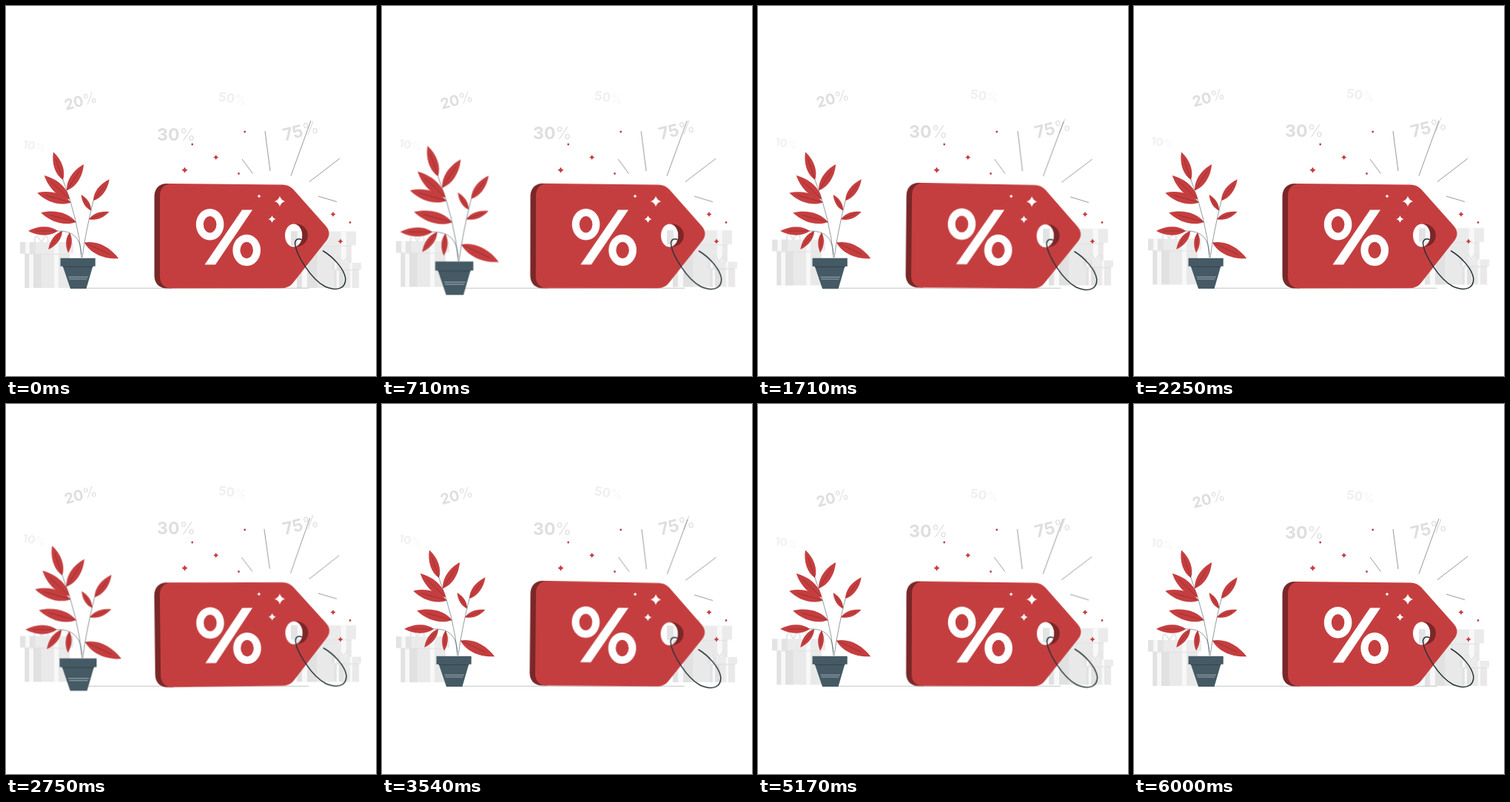
These frames come from a looping animation (500 px wide and 500 px high, 6.04 s). An HTML page:

```html
<!DOCTYPE html>
<html lang="en">
<head>
<meta charset="utf-8">
<title>Discount tag</title>
<style>
  html, body { margin: 0; width: 100%; height: 100%; overflow: hidden; background: #fff; }
  svg { display: block; width: 100%; height: 100%; }

  .float, .tag, .plant { animation: 6.04s linear infinite; }
  .float { animation-name: float; }
  .tag { animation-name: sway; transform-origin: 330px 268px; }
  .plant { animation-name: beat; transform-origin: 91.5px 289.5px; }

  @keyframes float {
    0%, 99.338%, 100% { transform: translateY(0); }
    49.669% { transform: translateY(-6px); }
  }
  /* four swings of 1.5 s */
  @keyframes sway {
    0%, 99.338%, 100% { transform: rotate(0deg); }
    6.209%, 31.043%, 55.877%, 80.712% { transform: rotate(1deg); }
    18.626%, 43.46%, 68.295%, 93.129% { transform: rotate(-1deg); }
  }
  @keyframes beat {
    0%, 28.5%, 39.5%, 58.5%, 100% { transform: scale(1); }
    10%, 49.5% { transform: scale(1.1); }
  }

  text { font-family: Inter, Roboto, sans-serif; font-weight: 700; text-anchor: middle; fill: #dedede; }
  text tspan { font-weight: 300; }
  .pale { fill: #efefef; }
  .pale tspan { fill: #f4f4f4; }
  .red { fill: #c53e3f; }
  .dark { fill: #7a2728; }
  .white { fill: #fff; }
  .dots { fill: none; stroke: #c53e3f; stroke-width: 2.8; stroke-linecap: round; }
  .bow { fill: none; stroke: #e6e6e6; stroke-width: 2; }
  .thin { fill: none; stroke: #37474f; stroke-width: .55; }
  .rib { stroke: #7a2728; stroke-width: .5; }
  .cord { fill: none; stroke: #263238; stroke-width: 1.5; stroke-linecap: round; }
</style>
</head>
<body>
<svg viewBox="0 0 500 500">
  <g class="float">
    <text transform="translate(230 173.2)" y="8.3" font-size="23">30<tspan>%</tspan></text>
    <text transform="translate(398 168.5) rotate(-14)" y="8.3" font-size="23">75<tspan>%</tspan></text>
    <text transform="translate(100.7 128.3) rotate(-15)" y="7.2" font-size="20">20<tspan>%</tspan></text>
    <text class="pale" transform="translate(306 125) rotate(9)" y="6" font-size="17">50<tspan>%</tspan></text>
    <text class="pale" transform="translate(38 189.5) rotate(10)" y="5.3" font-size="15">10<tspan>%</tspan></text>
  </g>

  <g class="float" id="gifts"></g>

  <path d="M95 381.3H409" stroke="#a8adb0" stroke-width=".7"/>

  <g class="tag">
    <path class="thin" d="M319 207L333.5 226.5M350 169L357 223M412 155L385 229.5M451 206L410 237.5M422 257L447 264.5"/>
    <path class="dark" d="M224 240H217C207 240 200.5 247 200.5 257V364C200.5 375 207 381.5 217 381.5H224Z"/>
    <path class="red" fill-rule="evenodd" d="M223 240L374 241.5Q382 241.5 388 247.5L432 297Q440.5 307 433 317L388 374Q383 381 373 381.3L223 381.5C214 381.5 208 375 208 366V256C208 247 214 240 223 240ZM377 310A11.7 15.5 0 1 0 400.4 310A11.7 15.5 0 1 0 377 310Z"/>
    <path class="dark" d="M390 294.3C414 294 414 326 390 325.7C404 323 404 297 390 294.3Z"/>
    <g fill="none" stroke="#fff" stroke-width="10">
      <ellipse cx="275.6" cy="295.2" rx="13.8" ry="16.2"/>
      <ellipse cx="325.2" cy="330" rx="13.8" ry="16.2"/>
    </g>
    <path class="white" d="M319 275.5H333L283 349.5H268.5Z"/>
    <g class="white" id="glints"></g>
    <path class="cord" d="M399 315.5C394 313.5 390.5 316 390.5 321C392 336 412 369 431 379C447 386 459.5 382 458.8 368C457 355 442 339 428.5 331"/>
  </g>

  <g class="red" id="sparks"></g>
  <path class="dots" d="M251.7 187h0M322.7 170h0M314.5 226.5h0M465 292.5h0"/>

  <g class="plant">
    <g id="branches"></g>
    <path fill="#455a64" d="M76.5 351H117.5L108.5 382H87Z"/>
    <path fill="#34474f" d="M76.5 351.5H117.5L117 353H77Z"/>
    <path fill="#455a64" d="M73.5 340.7H120.7V351.8H73.5Z"/>
    <path stroke="#a9b8bf" stroke-width=".9" d="M84.5 366.2H111M85.5 368.9H109.5"/>
  </g>
</svg>
<script>
  const add = (id, markup) => { document.getElementById(id).innerHTML += markup; };
  const rect = (x1, y1, x2, y2, fill) =>
    `<path fill="${fill}" d="M${x1} ${y1}H${x2}V${y2}H${x1}Z"/>`;

  // Box with lid, bow and two ribbons; all widths follow from w.
  function gift(x, top, w, lid, ribbon) {
    const at = f => x + w * f, y = top + lid, floor = 381;
    const strips = (shift, y1, y2) =>
      rect(at(0.1 + shift), y1, at(0.18 + shift), y2, '#f8f8f8') +
      rect(at(ribbon), y1, at(ribbon + 0.08), y2, '#f8f8f8');
    const c = at(0.4), r = 9;
    return `<path class="bow" d="M${c} ${top}q${-r} ${-r * 1.8} ${-r} 0M${c} ${top}q${r} ${-r * 1.8} ${r} 0"/>` +
      rect(at(0.09), y, at(0.93), floor, '#e9e9e9') +
      rect(at(0.09), y, at(0.4), floor, '#e1e1e1') + strips(0.07, y, floor) +
      rect(at(0.09), y, at(0.93), y + 1.2, '#e0e0e0') +
      rect(x, top, x + w, y, '#ebebeb') + rect(x, top, at(0.29), y, '#e3e3e3') + strips(0, top, y);
  }
  add('gifts', gift(19, 319, 72, 15.5, 0.64) + gift(385, 304.5, 88, 19, 0.77) + gift(440, 347, 40, 9, 0.62));

  // Four-pointed star.
  function star(x, y, r) {
    const k = r * 0.22;
    return `<path d="M${x} ${y - r}Q${x + k} ${y - k} ${x + r} ${y}Q${x + k} ${y + k} ${x} ${y + r}` +
      `Q${x - k} ${y + k} ${x - r} ${y}Q${x - k} ${y - k} ${x} ${y - r}Z"/>`;
  }
  add('glints', star(370, 264, 7.2) + star(359.5, 288, 5) + star(342, 257, 2.5));
  add('sparks', star(241.5, 221.7, 4) + star(283.7, 204.5, 3.5) + star(442, 281.5, 3.5) + star(452, 318, 3.5));

  function leaf(x, y, angle, len) {
    const h = len * 0.19, a = len * 0.25, b = len * 0.65;
    return `<g transform="translate(${x} ${y}) rotate(${angle})">` +
      `<path class="red" d="M0 0C${a} ${h} ${b} ${h} ${len} 0C${b} ${-h} ${a} ${-h} 0 0Z"/>` +
      `<path class="rib" d="M0 0H${len * 0.75}"/></g>`;
  }

  // Curved stem p-q-r; each leaf grows at a share of the way up, with an angle and a length.
  function branch(p, q, r, leaves) {
    const at = (t, i) => p[i] * (1 - t) ** 2 + 2 * q[i] * t * (1 - t) + r[i] * t * t;
    return `<path class="thin" d="M${p}Q${q} ${r}"/>` +
      leaves.map(([t, angle, len]) => leaf(at(t, 0), at(t, 1), angle, len)).join('');
  }
  add('branches',
    branch([102, 340], [98, 290], [77, 235],
      [[1, -109, 40], [0.87, -57, 42], [0.76, -137, 47], [0.72, -164, 47], [0.47, -165, 49]]) +
    branch([103, 340], [107, 308], [118, 263],
      [[1, -53, 36], [0.85, -122, 25], [0.71, -20, 29], [0.3, 25, 51]]) +
    branch([102, 336], [101, 303], [70, 304],
      [[1, 180, 40], [0.9, 127, 31], [0.7, 94, 27]]));
</script>
</body>
</html>
```
